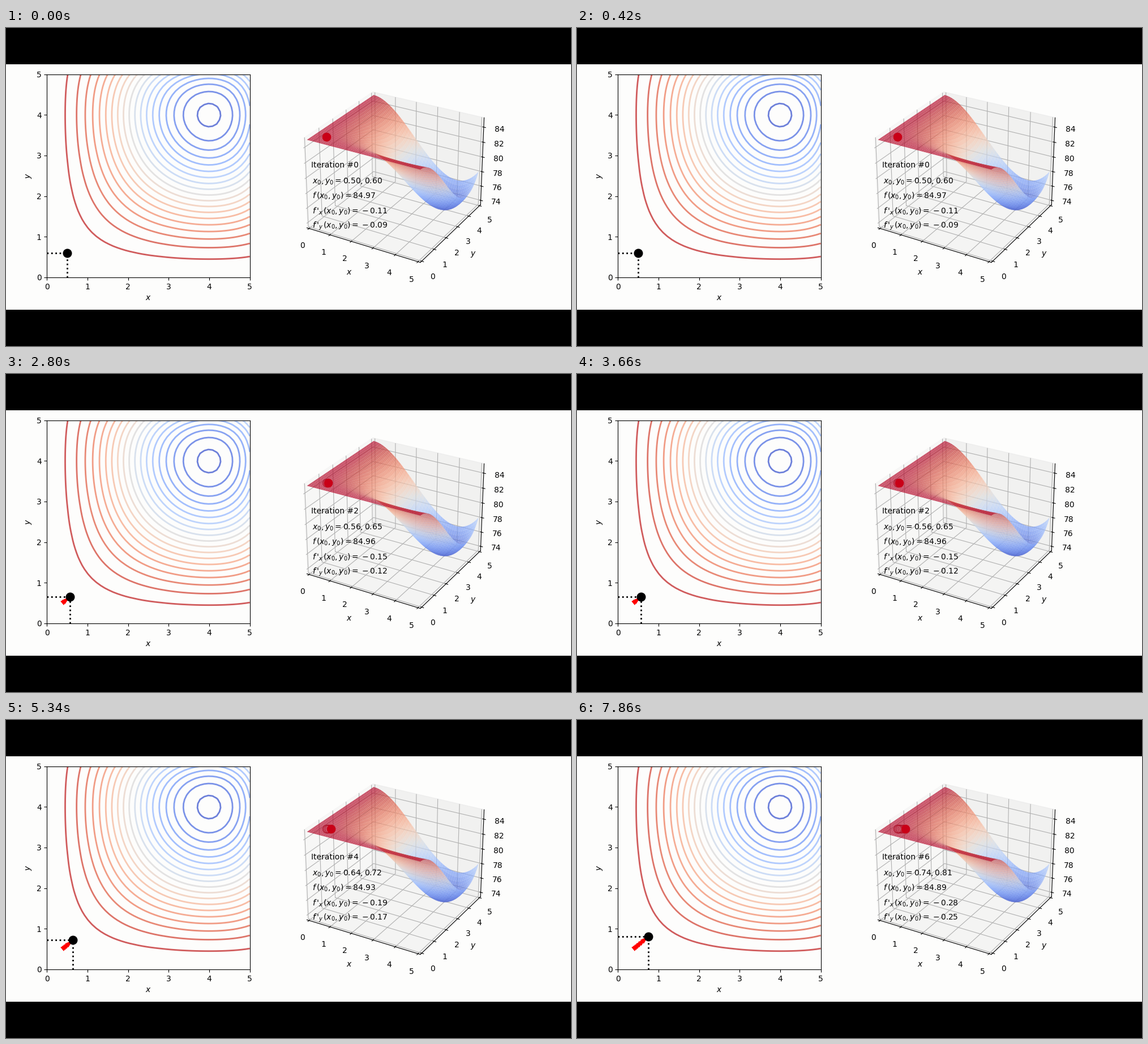
These frames come from a looping animation (998x561 px, 8000 ms). A matplotlib script:

```python
import numpy as np
import matplotlib.pyplot as plt
from matplotlib.animation import FuncAnimation
from matplotlib.patches import Polygon, Rectangle

W, H, DPI = 998, 561, 100
SIDE = 358.2          # both plots are squares of about this many pixels
BOTTOM = 439.8
RATE, STEPS = 0.25, 6
INTERVAL, FRAMES, HOLD = 320, 25, 4
WHITE = "#fdfdfc"

plt.rcParams["font.family"] = "DejaVu Sans"
plt.rcParams["font.size"] = 10


def f(x, y):
    return 85 - x**2 * (x - 6) * y**2 * (y - 6) / 90


def gradient(x, y):
    return np.array([-(3 * x**2 - 12 * x) * y**2 * (y - 6),
                     -(3 * y**2 - 12 * y) * x**2 * (x - 6)]) / 90


def descend(start):
    points = [np.array(start)]
    for _ in range(STEPS):
        points.append(points[-1] - RATE * gradient(*points[-1]))
    return np.array(points)


def box(left, side=SIDE):
    return [left / W, 1 - BOTTOM / H, side / W, side / H]


def padded(lo, hi):
    margin = (hi - lo) / 48
    return lo - margin, hi + margin


def arrow_head(p, q, length=14.5, half=4.5):
    """Triangle with its tip at q, pointing away from p; sizes in pixels."""
    d = (q - p) / np.hypot(*(q - p)) * 5 / SIDE
    base = q - d * length
    side = np.array([-d[1], d[0]]) * half
    return Polygon([q, base + side, base - side], color="red", lw=0, zorder=3)


path = descend((0.5, 0.6))
heights = f(path[:, 0], path[:, 1])
grid = np.linspace(0, 5, 50)
X, Y = np.meshgrid(grid, grid)
Z = f(X, Y)

fig = plt.figure(figsize=(W / DPI, H / DPI), dpi=DPI, facecolor="black")
fig.add_artist(Rectangle((0, 1 - 497 / H), 1, 433 / H, color=WHITE, lw=0,
                         transform=fig.transFigure, zorder=-5))

# contour plot
ax = fig.add_axes(box(72.4), facecolor=WHITE)
ax.contour(X, Y, Z, levels=np.arange(73.2, 85.3, 0.6), cmap="coolwarm",
           linewidths=2, alpha=0.8)
ax.set(xlim=(0, 5), ylim=(0, 5), xlabel="$x$", ylabel="$y$",
       xticks=range(6), yticks=range(6))
drop_x, = ax.plot([], [], "k:", lw=2)
drop_y, = ax.plot([], [], "k:", lw=2)
heads = [ax.add_patch(arrow_head(p, q)) for p, q in zip(path, path[1:])]
dot, = ax.plot([], [], "ko", ms=10.5, zorder=5)

# surface plot
ax3 = fig.add_axes(box(503.5, 358.8), projection="3d", computed_zorder=False)
ax3.patch.set_visible(False)
ax3.view_init(elev=27.5, azim=-60)
ax3.set_box_aspect((4, 4, 3.06), zoom=0.997)
ax3.tick_params(pad=4.5)
ax3.plot_surface(X, Y, Z, cmap="coolwarm", rstride=1, cstride=1,
                 alpha=0.69, linewidth=0.4)
trail, = ax3.plot([0], [0], [85], "o", ms=10.2, mfc="none", zorder=6,
                  mec=(0.68, 0.03, 0.12, 0.6), mew=0.8, ls="none")
ball, = ax3.plot([0], [0], [85], "o", ms=10.2, color="#c90017", zorder=7)
ax3.set(xlim=padded(0, 5), ylim=padded(0, 5), zlim=padded(Z.min(), Z.max()),
        xlabel="$x$", ylabel="$y$", xticks=range(6), yticks=range(6),
        zticks=range(74, 85, 2))

title = fig.text(539 / W, 1 - 246 / H, "", zorder=10)
formulas = [fig.text(541 / W, 1 - y / H, "", zorder=10)
            for y in (274, 300, 326.5, 352.5)]


def signed(value):
    return (r"\:{-}\:" if value < 0 else "") + f"{abs(value):.2f}"


def partial(name, value):
    return rf"$f\,'_{name}\,(x_0, y_0) = " + signed(value) + "$"


def update(i):
    k = min(i // HOLD, STEPS)
    x, y = path[k]
    z = heights[k]
    gx, gy = gradient(x, y)

    drop_x.set_data([x, x], [0, y])
    drop_y.set_data([0, x], [y, y])
    dot.set_data([x], [y])
    for j, head in enumerate(heads):
        head.set_visible(j < k)

    trail.set_data_3d(path[:k + 1, 0], path[:k + 1, 1], heights[:k + 1])
    ball.set_data_3d([x], [y], [z])

    title.set_text(f"Iteration #{k}")
    texts = (f"$x_0, y_0 = {x:.2f}, {y:.2f}$",
             rf"$f\,(x_0, y_0) = {z:.2f}$",
             partial("x", gx), partial("y", gy))
    for line, text in zip(formulas, texts):
        line.set_text(text)
    return [drop_x, drop_y, dot, *heads, trail, ball, title, *formulas]


anim = FuncAnimation(fig, update, frames=FRAMES, interval=INTERVAL,
                     repeat=True, repeat_delay=0, blit=False)
plt.show()
```
